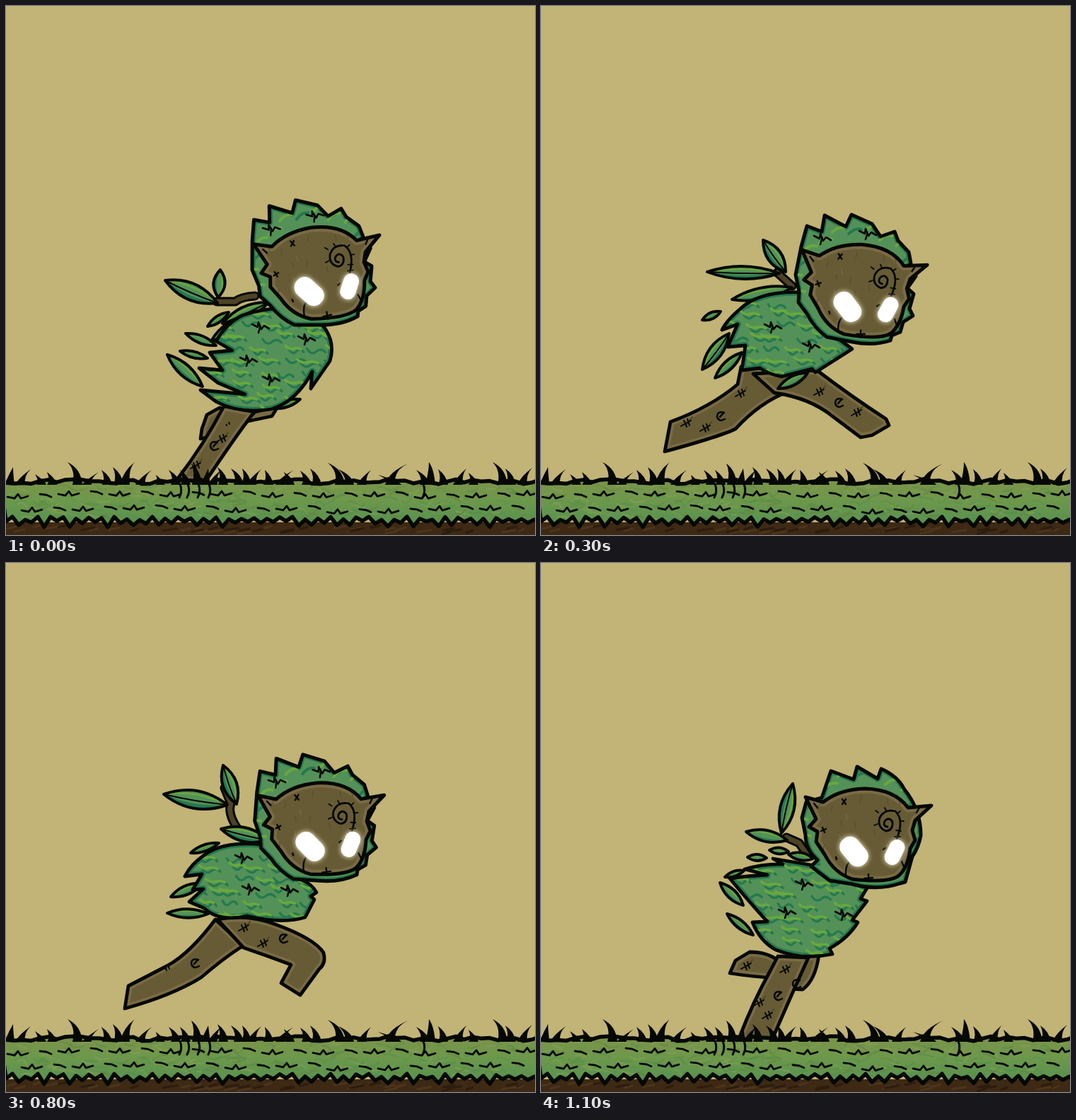
An HTML page with a canvas for the animation above (1200 ms loop, 748 by 748 pixels).

```html
<!DOCTYPE html>
<html>
<head>
<meta charset="utf-8">
<title>Forest sprite run cycle</title>
<style>
html, body { margin: 0; width: 100%; height: 100%; overflow: hidden; background: #c2b377; }
canvas { display: block; }
</style>
</head>
<body>
<canvas id="stage" width="748" height="748"></canvas>
<script>
const ctx = document.getElementById('stage').getContext('2d');
const INK = '#050805', GREEN = '#549158', DARK = '#25794f', LIGHT = '#68a83f';
const BARK = '#665b34', BARK_LIGHT = '#7a6b45', BARK_DARK = '#4d4325';
const BG = '#c2b377', STEP = 100;

function seeded(s) {
  return () => (s = (s * 16807) % 2147483647) / 2147483647;
}

function stroke(c, path, color, width) {
  c.strokeStyle = color;
  c.lineWidth = width;
  c.lineCap = c.lineJoin = 'round';
  c.stroke(typeof path === 'string' ? new Path2D(path) : path);
}

// Filled shape with an inner rim and an ink outline; extra() paints inside it.
function shape(d, fill, rim, rimWidth, line, extra) {
  const p = new Path2D(d);
  ctx.save();
  ctx.clip(p);
  ctx.fillStyle = fill;
  ctx.fill(p);
  if (rim) stroke(ctx, p, rim, rimWidth);
  if (extra) extra();
  ctx.restore();
  stroke(ctx, p, INK, line);
}

function leaf([x1, y1, x2, y2, w]) {
  const len = Math.hypot(x2 - x1, y2 - y1);
  const nx = -(y2 - y1) / len * w * 1.8, ny = (x2 - x1) / len * w * 1.8;
  const mx = (x1 + x2) / 2, my = (y1 + y2) / 2;
  const curve = k => `Q${mx + nx * k} ${my + ny * k} `;
  shape(`M${x1} ${y1}${curve(1)}${x2} ${y2}${curve(-1)}${x1} ${y1}Z`, GREEN, null, 0, 4, () => {
    ctx.fillStyle = DARK;
    ctx.fill(new Path2D(`M${x1} ${y1}${curve(1)}${x2} ${y2}${curve(.45)}${x1} ${y1}`));
    stroke(ctx, `M${x1} ${y1}${curve(-.55)}${x2} ${y2}`, LIGHT, 2.5);
  });
  if (w > 9) stroke(ctx, `M${x1} ${y1}${curve(.12)}${x2} ${y2}`, INK, 2);
}

function pairs(list, draw) {
  for (let i = 0; i < list.length; i += 2) draw(list[i], list[i + 1], i);
}

const tick = (x, y) => stroke(ctx, `M${x - 7} ${y + 4}L${x + 7} ${y - 4}M${x - 3} ${y - 4}L${x + 1} ${y + 5}M${x + 2} ${y - 6}L${x + 5} ${y + 3}`, INK, 2);
const curl = (x, y) => stroke(ctx, `M${x - 2} ${y + 1}Q${x + 1} ${y - 3} ${x + 4} ${y - 5}Q${x - 6} ${y - 8} ${x - 6} ${y + 1}Q${x - 3} ${y + 9} ${x + 5} ${y + 4}`, INK, 2.5);
const tuft = (x, y) => stroke(ctx, `M${x - 12} ${y - 5}L${x - 4} ${y - 1}L${x - 3} ${y - 8}L${x + 1} ${y + 2}L${x + 5} ${y - 3}L${x + 12} ${y + 1}M${x - 1} ${y}L${x - 3} ${y + 7}`, INK, 2.6);

// Each hood is given where its own head stands: [x, y, degrees].
const hoods = {
  crest: { at: [447, 404, 3], d: 'M368 340L376 311L397 319L401 296L431 312L439 295L468 308L480 326L500 319L505 332L520 348L523 364L516 372L530 382L518 399L527 407L521 428L526 438L512 447L508 461L496 466L494 473Q470 481 440 475L404 468Q386 455 376 435L364 419L365 404L360 380Z' },
  crown: { at: [413, 371, -17], d: 'M319 346L316 322L311 288L338 299L336 270L374 282L379 258L420 285L424 276L446 298L482 355L488 357L478 385L470 424L464 436L437 443L408 455L394 449L374 440L365 444L358 428Q336 410 330 394L333 386L321 362L326 352Z' },
  leafy: { at: [435, 386, 0], d: 'M377 332L390 294L422 306L427 288L456 305L461 291Q485 302 493 319Q517 348 517 385Q514 402 505 415L495 451L488 453Q455 464 420 454L388 449L362 429L371 420Q354 405 354 385L349 360L355 338Z' }
};

function hood(kind, [x, y, deg]) {
  const h = hoods[kind];
  ctx.save();
  ctx.translate(x, y);
  ctx.rotate((deg - h.at[2]) * Math.PI / 180);
  ctx.translate(-h.at[0], -h.at[1]);
  shape(h.d, GREEN, DARK, 9, 5, () => {
    const [cx, cy] = h.at;
    for (let i = 0; i < 15; i++) {
      const a = 2.6 + i * .26, r = 82 + (i * 7) % 13;
      const px = cx + r * Math.cos(a), py = cy + r * Math.sin(a);
      stroke(ctx, `M${px - 9} ${py + 4}Q${px} ${py - 5} ${px + 9} ${py - 2}`, i % 4 ? LIGHT : DARK, 4);
    }
  });
  if (kind !== 'leafy') {
    const top = kind === 'crest' ? [398, 330, 462, 323] : [342, 318, 372, 309];
    pairs(top, tuft);
  }
  ctx.restore();
}

const FACE = 'M354 331L379 338Q402 320 438 319Q480 320 499 346L532 343L509 364L505 378L509 392L502 404Q499 430 486 442Q472 453 420 447Q394 438 381 412L369 394L371 380L359 373L369 362Z';
const SWIRL = 'M470 373Q463 372 466 365Q472 358 477 366Q478 378 468 379Q455 374 459 360Q466 347 481 351Q494 363 483 390';

function eye(x, y, a, b, angle) {
  ctx.save();
  ctx.translate(x, y);
  ctx.rotate(angle);
  ctx.fillStyle = '#fff';
  ctx.shadowColor = '#fff8dc';
  ctx.shadowBlur = 7;
  ctx.beginPath();
  ctx.roundRect(-a, -b, 2 * a, 2 * b, b * .95);
  ctx.fill();
  ctx.restore();
}

function face([x, y, deg]) {
  ctx.save();
  ctx.translate(x, y);
  ctx.rotate(deg * Math.PI / 180);
  ctx.translate(-435, -386);
  shape(FACE, BARK, BARK_LIGHT, 13, 5, () => {
    const rnd = seeded(31);
    for (let i = 0; i < 22; i++) {
      const px = 375 + rnd() * 125, py = 325 + rnd() * 115;
      stroke(ctx, `M${px} ${py}l${rnd() * 4 - 2} 8`, i % 2 ? '#756842' : '#5b512e', 1.6);
    }
  });
  stroke(ctx, SWIRL, INK, 2.8);
  stroke(ctx, 'M457 353l-4-3M456 369l-5 2M468 350l-2-4M484 354l4-3M488 365l5 0M482 378l7 1M480 387l8 0', INK, 1.8);
  stroke(ctx, 'M415 424Q410 430 411 442M490 422L494 432M443 440L443 450M437 446L449 445M406 334L411 341M411 334L406 341M378 374L381 381M376 379L383 376M515 346L511 353M464 405l3-2M397 416l1 3M366 340l5 6', INK, 2.4);
  eye(422.5, 408, 23, 14.5, .87);
  eye(480, 409, 18.5, 11, 2.02);
  ctx.restore();
}

function body(d, tufts) {
  shape(d, GREEN, DARK, 10, 4.8, () => {
    const rnd = seeded(77);
    for (let y = 408; y < 575; y += 17) {
      for (let x = 245; x < 470; x += 33) {
        const px = x + rnd() * 20, py = y + rnd() * 10, w = 15 + rnd() * 10;
        const arc = o => `M${px + o} ${py + o}q${w * .3} ${6 + o} ${w * .6} 4t${w * .6} 1`;
        stroke(ctx, arc(4), DARK, 3.2);
        if (rnd() < .75) stroke(ctx, arc(0), LIGHT, 3.6);
      }
    }
  });
  pairs(tufts, tuft);
}

function legs(list, marks, curls) {
  const all = new Path2D();
  for (const d of list) {
    all.addPath(new Path2D(d));
    shape(d, BARK, BARK_LIGHT, 12, 4.8);
  }
  ctx.save();
  ctx.clip(all);
  pairs(marks, (x, y) => {
    stroke(ctx, `M${x + 9} ${y - 9}l-9 12`, BARK_DARK, 2);
    tick(x, y);
  });
  pairs(curls, curl);
  ctx.restore();
}

const poses = {
  plant: {
    hood: 'crest', head: [438, 380, -8], stem: 'M352 410Q333 411 324 418L298 418',
    back: [[225, 388, 299, 420, 13], [303, 373, 300, 412, 9], [285, 453, 315, 433, 5], [254, 463, 297, 480, 6], [246, 488, 285, 498, 5], [228, 493, 278, 538, 9], [378, 569, 416, 556, 5], [306, 449, 371, 419, 10], [290, 474, 345, 440, 10]],
    legs: ['M302 568L284 578L277 598L275 612L292 608L330 575Z', 'M338 588L352 574L384 567L376 580Z', 'M308 566L351 574Q320 615 281 674L243 668Q280 620 308 566Z'],
    marks: [311, 588, 305, 612, 268, 650], curls: [295, 622],
    body: 'M335 437Q400 416 440 443Q468 470 458 502L431 541L433 517Q410 560 375 570Q330 577 298 560L275 543L338 549L300 533L273 512L306 515L288 490L320 487L297 474Q312 448 335 437Z',
    tufts: [360, 455, 425, 472, 343, 502, 375, 529]
  },
  push: {
    hood: 'crown', head: [413, 371, -17], stem: 'M338 410L307 412Q290 412 282 397',
    back: [[228, 370, 284, 399, 12], [232, 465, 287, 413, 13], [232, 498, 270, 470, 7], [231, 555, 266, 526, 7], [261, 555, 278, 548, 4], [267, 463, 340, 424, 10]],
    legs: ['M285 546Q255 600 203 668L245 676Q290 597 320 582Q345 568 410 538L385 524Z', 'M378 529L440 532Q456 548 441 565Q410 573 367 600L361 576Q370 553 418 546Q390 537 366 548Z'],
    marks: [283, 575, 322, 560, 235, 645, 258, 625, 385, 565], curls: [269, 603, 431, 546],
    body: 'M345 422Q310 435 285 462Q262 485 250 523L274 508L269 541L291 525L287 546Q340 545 382 522Q440 495 452 465Q460 450 455 435L400 430ZM386 520Q420 493 437 512Q449 527 445 538Q430 525 386 520Z',
    tufts: [325, 457, 415, 458, 322, 495, 375, 482]
  },
  leap: {
    hood: 'crest', head: [447, 404, 3], stem: 'M355 396L334 377',
    back: [[235, 376, 337, 378, 10], [314, 331, 346, 376, 11], [228, 444, 254, 432, 5], [228, 514, 266, 463, 10], [246, 526, 284, 490, 7], [270, 415, 355, 398, 9]],
    legs: ['M283 510L278 535Q240 567 183 588L175 630Q255 608 275 598Q310 560 350 545L380 515Z', 'M300 520L390 515Q440 553 488 584L492 593L468 607L452 610L412 580Q380 554 330 547Z'],
    marks: [282, 548, 205, 590, 232, 597, 393, 546, 446, 575], curls: [255, 580, 422, 561],
    body: 'M370 405Q310 402 282 428Q262 445 256 458L278 450Q270 468 264 482L289 480L284 515L310 512Q320 520 340 524L383 513L388 518L440 485L420 470Z',
    tufts: [328, 455, 382, 482], front: [[335, 541, 377, 519, 7]]
  },
  land: {
    hood: 'leafy', head: [435, 386, 0], stem: 'M346 388L355 393L356 410',
    back: [[288, 371, 342, 392, 10], [366, 318, 337, 385, 11], [272, 416, 299, 417, 5], [303, 406, 330, 408, 5], [330, 412, 365, 418, 6], [240, 444, 267, 435, 4], [233, 452, 266, 484, 7], [243, 496, 280, 526, 6]],
    legs: ['M340 555L382 551Q360 615 322 678L283 672Q300 630 318 600Z', 'M315 552L356 557Q355 597 328 607Q285 598 228 585L237 565Q250 550 262 553Q300 558 320 572Z'],
    marks: [285, 570, 285, 583, 310, 620, 320, 645], curls: [325, 600, 337, 613],
    body: 'M380 430L308 418L322 426Q295 425 268 433L300 441Q275 442 247 446Q275 480 300 507L279 508Q290 535 312 547Q350 562 392 553L388 545Q415 530 428 508L420 505L441 478L432 475Q440 460 445 455Z',
    tufts: [352, 455, 328, 495, 408, 498]
  },
  push2: {
    hood: 'crown', head: [430, 379, -16], stem: 'M350 411L322 412L287 404',
    back: [[212, 437, 287, 410, 12], [273, 348, 300, 402, 12], [235, 560, 267, 532, 7], [260, 566, 325, 554, 5], [266, 467, 352, 423, 11]],
    legs: ['M315 552Q270 590 226 666L265 676Q300 605 330 577L380 550Z', 'M325 548Q360 530 405 522Q440 530 440 555Q432 575 405 588Q370 592 346 606L343 585Q350 565 380 552Q355 558 325 548Z'],
    marks: [300, 578, 270, 640, 250, 650, 375, 572, 405, 565], curls: [284, 606, 430, 548],
    body: 'M360 420Q320 432 300 450Q265 490 251 528L276 516L272 543L294 528L288 549Q340 548 385 525Q430 505 455 475L465 445L400 432Z',
    tufts: [340, 448, 335, 495, 412, 462, 420, 496], front: [[380, 530, 423, 508, 6]]
  },
  leap2: {
    hood: 'crest', head: [450, 381, 3], stem: 'M336 379Q322 358 327 344L318 322',
    back: [[232, 331, 322, 346, 14], [316, 290, 335, 345, 11], [313, 380, 380, 396, 11], [270, 414, 310, 400, 5], [242, 476, 287, 457, 7], [237, 499, 295, 500, 7]],
    legs: ['M305 508Q275 545 248 557L187 562L180 590Q240 585 280 582Q320 555 345 545Z', 'M308 508Q350 500 385 515Q425 530 435 548L483 588L475 595L452 598Q410 565 345 545Q315 530 308 508Z'],
    marks: [372, 542, 195, 570, 235, 575, 345, 520, 455, 580], curls: [277, 570, 402, 535],
    body: 'M370 402Q320 397 292 415Q270 430 262 447L286 444L273 466L288 465L268 483L289 492Q310 512 350 503Q400 515 432 505L445 480L440 475L448 470Q440 455 420 450Z',
    tufts: [345, 422, 355, 466, 410, 468]
  }
};

poses.land2 = {
  ...poses.land,
  stem: 'M327 388L345 396L356 412',
  back: [[270, 380, 328, 392, 9], [336, 312, 320, 382, 11], ...poses.land.back.slice(2)],
  legs: ['M350 558L373 554Q368 590 350 603L330 602Z', 'M275 550Q300 550 315 562L308 587Q265 583 247 580L255 562Z', 'M315 556L358 558Q330 620 305 678L260 672Q280 620 305 575Z'],
  marks: [270, 570, 325, 575, 300, 640, 288, 622], curls: [316, 612, 342, 595]
};

const touchDown = ['M318 548Q280 560 255 562L203 588L208 612Q280 600 325 580L345 560Z', 'M335 555L388 548Q385 610 372 676L332 674Q345 610 335 580Z'];
const stretch = ['M283 515Q240 570 178 622L172 656Q255 625 300 585Q325 565 345 548Z', 'M310 522L395 513Q450 535 475 560Q482 575 470 582L435 622L408 604L428 575Q400 560 345 552Z'];
const stretch2 = ['M305 508Q270 555 238 573L182 602L177 634Q245 615 285 590Q320 560 345 545Z', 'M308 508Q350 500 390 515Q445 535 458 555Q462 570 452 578L425 615L398 598L412 572Q380 560 345 548Z'];

// pose, shift x, shift y, changes
const cycle = [
  ['plant', 0, 0], ['push', 0, 0],
  ['leap', -16, -18, { legs: stretch, head: [447, 403, -4] }],
  ['leap', 0, 0],
  ['land', 6, -3, { legs: touchDown, head: [435, 393, 2] }],
  ['land', 0, 0], ['plant', -6, 3], ['push2', 0, 0],
  ['leap2', -9, -4, { legs: stretch2, head: [450, 382, -4] }],
  ['leap2', 0, 0],
  ['land2', 17, -4, { legs: touchDown, head: [435, 387, 1] }],
  ['land2', 20, 0]
];

function sprite([name, dx, dy, change]) {
  const p = { ...poses[name], ...change };
  ctx.save();
  ctx.translate(dx, dy);
  stroke(ctx, p.stem, INK, 13);
  stroke(ctx, p.stem, BARK_DARK, 7);
  p.back.forEach(leaf);
  legs(p.legs, p.marks, p.curls);
  body(p.body, p.tufts);
  (p.front || []).forEach(leaf);
  hood(p.hood, p.head);
  face(p.head);
  ctx.restore();
}

function makeGround() {
  const cv = document.createElement('canvas');
  cv.width = cv.height = 748;
  const c = cv.getContext('2d'), rnd = seeded(412);
  c.fillStyle = '#3d2914';
  c.fillRect(0, 730, 748, 18);
  for (let i = 0; i < 45; i++) {
    const x = rnd() * 748;
    stroke(c, `M${x} ${737 + rnd() * 10}l${8 + rnd() * 12} -3`, i % 2 ? '#2c1d0e' : '#4c351b', 3);
  }
  let edge = 'M-8 672';
  for (let x = 0; x <= 756; x += 12) edge += `L${x} ${669 + rnd() * 7}`;
  let hem = '';
  for (let x = 756; x >= -8; x -= 9) hem += `L${x} ${x % 2 ? 722 + rnd() * 5 : 728 + rnd() * 9}`;
  const turf = new Path2D(edge + hem + 'Z');
  const g = c.createLinearGradient(0, 668, 0, 732);
  g.addColorStop(0, '#7d924a');
  g.addColorStop(.45, '#6e984b');
  g.addColorStop(1, '#579250');
  c.fillStyle = g;
  c.fill(turf);
  c.save();
  c.clip(turf);
  for (let i = 0; i < 190; i++) {
    const x = rnd() * 748, y = 676 + rnd() * 50;
    c.globalAlpha = .3 + rnd() * .25;
    stroke(c, `M${x} ${y}q6 ${rnd() * 14 - 7} ${10 + rnd() * 10} ${rnd() * 16 - 8}`, ['#8aa357', '#64803d', '#4f8c4a'][i % 3], 2.5);
  }
  c.restore();
  stroke(c, turf, INK, 5.5);
  for (let row = 0; row < 2; row++) {
    for (let x = 12 + row * 20; x < 748; x += 72) {
      const y = 689 + row * 21 + rnd() * 6;
      stroke(c, `M${x - 10} ${y}l10 2l5 -6l4 6l10 -3M${x + 36} ${y - 4}l9 1l7 3`, INK, 2.8);
    }
  }
  // Blades: root x, tip x, tip y
  const blades = [
    5, 10, 652, 20, 35, 655, 50, 41, 662, 65, 58, 659, 101, 87, 645, 114, 131, 659, 143, 135, 656,
    159, 151, 652, 168, 182, 645, 190, 206, 656, 218, 212, 663, 240, 230, 656, 254, 246, 656, 270, 262, 647,
    282, 286, 654, 292, 304, 656, 307, 299, 652, 329, 318, 654, 340, 334, 654, 347, 361, 655, 371, 366, 656,
    388, 407, 656, 401, 393, 659, 425, 416, 657, 439, 430, 654, 472, 455, 646, 485, 470, 655, 503, 516, 656,
    543, 571, 646, 552, 526, 663, 592, 580, 656, 600, 598, 645, 618, 611, 655, 639, 651, 654, 661, 654, 660,
    702, 688, 645, 714, 706, 654, 730, 744, 653];
  c.fillStyle = INK;
  for (let i = 0; i < blades.length; i += 3) {
    const [x, tx, ty] = blades.slice(i, i + 3);
    c.fill(new Path2D(`M${x - 7} 677Q${x - 2} ${ty + 12} ${tx} ${ty}Q${x + 5} ${ty + 9} ${x + 7} 677Z`));
  }
  for (const x of [246, 257, 272, 287, 590]) stroke(c, `M${x} 676Q${x + 4} 686 ${x - 1} 695`, INK, 3);
  return cv;
}

const ground = makeGround();
const start = performance.now();

function draw() {
  const t = Math.max(0, performance.now() - start);
  ctx.fillStyle = BG;
  ctx.fillRect(0, 0, 748, 748);
  sprite(cycle[Math.floor(t / STEP) % cycle.length]);
  ctx.drawImage(ground, 0, 0);
  requestAnimationFrame(draw);
}
draw();
</script>
</body>
</html>
```
